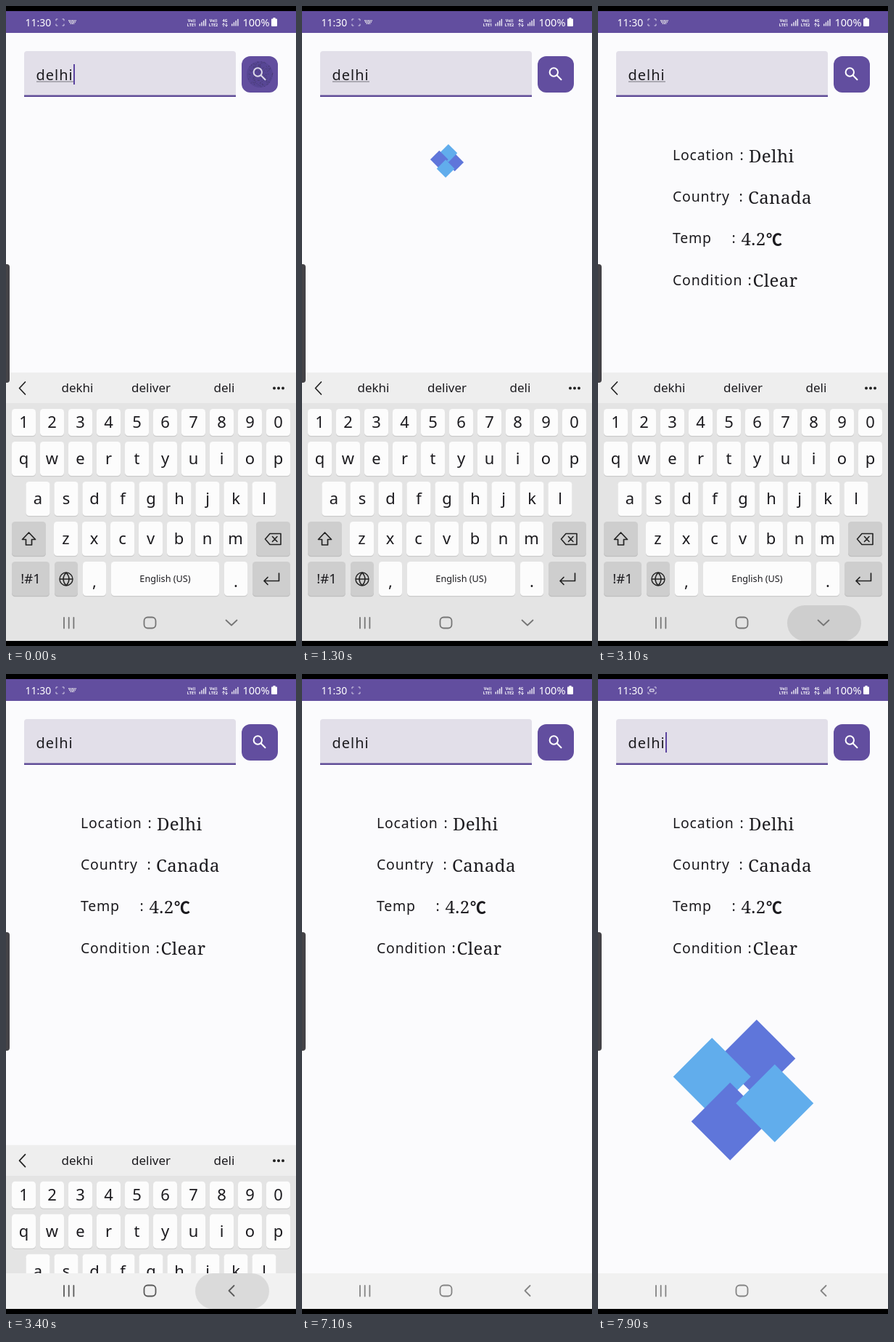
Animation of 400x880 px, one loop 8000 ms. Source, as an HTML page:

```html
<!DOCTYPE html>
<html lang="en">
<head>
<meta charset="utf-8">
<title>Weather search</title>
<style>
html, body { margin: 0; width: 100%; height: 100%; overflow: hidden; background: #fbfbfd; }
svg { display: block; width: 400px; height: 880px; }
text { font-family: "Noto Sans", "Open Sans", sans-serif; fill: #1c1b1f; white-space: pre; }
.mid { text-anchor: middle; }
.label { font-size: 19.5px; letter-spacing: .8px; }
.value { font-family: "Noto Serif", serif; font-size: 24px; letter-spacing: .4px; }
.unit { font: bold 22px "Noto Sans CJK JP", "Noto Sans CJK", sans-serif; }
.line { fill: none; stroke-linecap: round; stroke-linejoin: round; }
.bar text { fill: #fff; }
.tiny { font-size: 5.5px; font-weight: 700; text-anchor: middle; }
</style>
</head>
<body>
<svg id="stage" viewBox="0 0 400 880">
  <defs>
    <clipPath id="above"><rect width="400" height="824"/></clipPath>
    <clipPath id="btnClip"><rect x="325" y="69" width="50" height="50" rx="12"/></clipPath>
  </defs>
  <rect width="400" height="880" fill="#fbfbfd"/>

  <path d="M25 125V66q0-4 4-4H313q4 0 4 4V125z" fill="#e2dfe9"/>
  <rect x="25" y="122.5" width="292" height="2.5" fill="#604d98"/>
  <text x="41.5" y="102" font-size="20" letter-spacing="1">delhi</text>
  <rect id="spell" x="42" y="103.5" width="51" height="1" fill="#77747d"/>
  <rect id="caret" x="93" y="80" width="2" height="28" fill="#5d45a0"/>

  <rect x="325" y="69" width="50" height="50" rx="12" fill="#624e9f"/>
  <g id="ripple" clip-path="url(#btnClip)"></g>
  <g id="lens" class="line" stroke="#fff" stroke-width="2">
    <circle cx="347.3" cy="91" r="5.7"/><path d="M351.8 95.5L357.5 101.2"/>
  </g>

  <g id="results"></g>
  <g id="loader"></g>

  <rect id="nav" y="824" width="400" height="49" fill="#f1f1f1"/>
  <g clip-path="url(#above)"><g id="keys"></g></g>
  <rect id="press" x="261" y="824" width="102" height="49" rx="24.5" fill="#cecece"/>
  <g id="navIcons" class="line" stroke-width="1.8">
    <path d="M80 841V855.5M86.7 841V855.5M93.4 841V855.5"/>
    <rect x="190.5" y="840.5" width="16" height="15" rx="5"/>
    <path id="down" d="M303.5 844.5L311 851.5L318.5 844.5"/>
    <path id="back" d="M314.5 841L307.5 848L314.5 855"/>
  </g>

  <path d="M0 355H1q4 0 4 4V514q0 4-4 4H0z" fill="#444347"/>

  <rect width="400" height="7"/>
  <rect y="7" width="400" height="30" fill="#624e9f"/>
  <g class="bar" id="status">
    <text x="26.5" y="28" font-size="14">11:30</text>
    <path d="M69 20V18H71M78 18H80V20M80 25V27H78M71 27H69V25" class="line" stroke="#d5cfe6" stroke-width="1"/>
    <path id="cast" d="M72 21H77V24H72z" class="line" stroke="#fff"/>
    <path id="kbIcon" d="M86 20.2H97M87 22.2H96M88.5 24.2H94.5" stroke="#eee" stroke-width="1.3" stroke-dasharray="2 .5"/>
    <text class="tiny" x="256" y="21.5">Vo))</text><text class="tiny" x="256" y="28">LTE1</text>
    <text class="tiny" x="286" y="21.5">Vo))</text><text class="tiny" x="286" y="28">LTE2</text>
    <text class="tiny" x="302" y="21.5">4G</text>
    <path d="M300 28V24M298.6 25.4L300 23.8L301.4 25.4M304 23.8V28M302.6 26.4L304 28L305.4 26.4" class="line" stroke="#fff" stroke-width=".9"/>
    <text x="326.5" y="28" font-size="14.5">100%</text>
    <path d="M368.5 16H371.5V17.5H373q1 0 1 1V27q0 1-1 1H367q-1 0-1-1V18.5q0-1 1-1H368.5z" fill="#fff"/>
  </g>
  <rect y="873" width="400" height="7"/>
</svg>
<script>
const LOOP = 8000;
const $ = id => document.getElementById(id);

function add(parent, tag, attrs, content) {
  const el = document.createElementNS("http://www.w3.org/2000/svg", tag);
  for (const k in attrs) el.setAttribute(k, attrs[k]);
  if (content) el.textContent = content;
  parent.appendChild(el);
  return el;
}
const show = (el, on) => el.setAttribute("visibility", on ? "visible" : "hidden");
const ramp = (t, a, b) => Math.min(1, Math.max(0, (t - a) / (b - a)));

// Signal bars
for (const x of [266.5, 292, 311]) {
  if (x === 292) continue;
  for (let i = 0; i < 4; i++) {
    const h = 3 + i * 2.2;
    add($("status"), "rect", { x: x + i * 2.7, y: 27.5 - h, width: 1.5, height: h, fill: "#fff", opacity: .85 });
  }
}

// Weather rows: label, colon x, value x, value
[["Location", 195.5, 208, "Delhi"], ["Country", 194.5, 207, "Canada"],
 ["Temp", 184.5, 197.5, "4.2"], ["Condition", 206.5, 213.5, "Clear"]
].forEach(([label, cx, vx, value], i) => {
  const y = 212 + i * 57.2;
  add($("results"), "text", { x: 103, y, class: "label" }, label);
  add($("results"), "text", { x: cx, y, class: "label" }, ":");
  add($("results"), "text", { x: vx, y: y + 2.7, class: "value" }, value);
});
add($("results"), "text", { x: 232, y: 328.5, class: "unit" }, "℃");

// Keyboard
const kb = $("keys");
function key(x, y, w, h, label, size = 22, dark = false) {
  add(kb, "rect", { x, y: y + 1.2, width: w, height: h, rx: 4.5, fill: dark ? "#bebebe" : "#cbcbcb" });
  add(kb, "rect", { x, y, width: w, height: h, rx: 4.5, fill: dark ? "#cecece" : "#fcfcfc" });
  if (label) add(kb, "text", { x: x + w / 2, y: y + h / 2 + size * .36, class: "mid", "font-size": size }, label);
}
function row(chars, x, y, h) {
  [...chars].forEach((c, i) => key(x + i * 39, y, 33, h, c));
}
const stroke = (d, w = 1.7) => add(kb, "path", { d, class: "line", stroke: "#222", "stroke-width": w });

add(kb, "rect", { y: 504, width: 400, height: 42, fill: "#eeeeee" });
add(kb, "rect", { y: 546, width: 400, height: 327, fill: "#e4e4e4" });
stroke("M26.5 517L18.5 525.5L26.5 534");
[["dekhi", 98.5], ["deliver", 200], ["deli", 301]].forEach(([s, x]) =>
  add(kb, "text", { x, y: 531, class: "mid", "font-size": 17 }, s));
for (const x of [370, 376, 382]) add(kb, "circle", { cx: x, cy: 525.5, r: 2, fill: "#222" });
row("1234567890", 8, 554, 37);
row("qwertyuiop", 8, 599, 47);
row("asdfghjkl", 27.5, 654, 47);
row("zxcvbnm", 66, 709, 47);
key(8, 709, 47, 47, "", 0, true);
stroke("M31.5 724L22.5 733.5H27.5V741H35.5V733.5H40.5z");
key(345, 709, 47, 47, "", 0, true);
stroke("M364 725.5H379V740.5H364L357.5 733zM367.5 729.5L374 736.5M374 729.5L367.5 736.5", 1.6);
key(8, 764, 52, 47, "!#1", 18.5, true);
key(67, 764, 32, 47, "", 0, true);
stroke("M74 788a9 9 0 1 0 18 0a9 9 0 1 0-18 0M74 788H92M83 779q-8 9 0 18q8-9 0-18", 1.4);
key(106, 764, 32, 47);
add(kb, "text", { x: 122, y: 799, class: "mid", "font-size": 22 }, ",");
key(145, 764, 149, 47, "English (US)", 12.7);
key(301, 764, 32, 47);
add(kb, "text", { x: 317, y: 799, class: "mid", "font-size": 22 }, ".");
key(340, 764, 52, 47, "", 0, true);
stroke("M376.5 780V790.5H356M361 785.5L356 790.5L361 795.5");

// Button press sparkle
add($("ripple"), "circle", { cx: 350, cy: 94, r: 18, fill: "#574694" });
let seed = 7;
const rnd = () => (seed = seed * 16807 % 2147483647) / 2147483647;
for (let i = 0; i < 130; i++) {
  const a = rnd() * 2 * Math.PI, r = 18 * Math.sqrt(rnd());
  add($("ripple"), "circle", { cx: 350 + r * Math.cos(a), cy: 94 + r * Math.sin(a), r: .6, fill: "#463a70" });
}

// Four diamonds circling a centre, listed from back to front
const DARK = "#5f76da", LIGHT = "#61adec";
const diamonds = [270, 180, 90, 0].map((turn, i) => ({
  turn, el: add($("loader"), "path", { d: "M0-53.5L53.5 0L0 53.5L-53.5 0z", fill: i % 2 ? LIGHT : DARK })
}));
const SPEED = 0.1746;
const loaders = [
  { from: 200, to: 1500, begin: 212, x: 200, y: 213, scale: .231 },
  { from: 7200, to: LOOP, begin: 7254, x: 200.5, y: 572, scale: 1 }
];
function drawLoader(t) {
  const l = loaders.find(o => t >= o.from && t < o.to);
  show($("loader"), l);
  if (!l) return;
  $("loader").setAttribute("transform", `translate(${l.x} ${l.y}) scale(${l.scale})`);
  for (const { turn, el } of diamonds) {
    const a = ((t - l.begin) * SPEED + turn) * Math.PI / 180;
    el.setAttribute("transform", `translate(${47 * Math.sin(a)} ${-47 * Math.cos(a)})`);
  }
}

function draw(t) {
  const caretOn = t < 100 || (t >= 600 && (t - 600) % 1000 < 500);
  show($("caret"), caretOn);
  show($("spell"), t < 3400);
  show($("results"), t >= 1500);
  show($("cast"), t >= 7700 || (t >= 5700 && t < 6200));
  show($("kbIcon"), t < 3600);

  const glow = 1 - ramp(t, 100, 600);
  $("ripple").setAttribute("opacity", glow);
  $("lens").setAttribute("opacity", 1 - .2 * glow);
  drawLoader(t);

  const slide = ramp(t, 3200, 3500);
  kb.setAttribute("transform", `translate(0 ${320 * slide * slide})`);
  show(kb, slide < 1);
  const open = t < 3300;
  $("nav").setAttribute("fill", open ? "#e4e4e4" : "#f1f1f1");
  show($("down"), open);
  show($("back"), !open);

  const grow = ramp(t, 2980, 3080);
  $("press").setAttribute("opacity", grow * (1 - ramp(t, 3250, 3650)));
  const grey = open ? 118 : 90 + 42 * ramp(t, 5100, 5400);
  $("navIcons").setAttribute("stroke", `rgb(${grey},${grey},${grey})`);
}

const start = performance.now();
function tick() {
  draw((performance.now() - start) % LOOP);
  requestAnimationFrame(tick);
}
tick();
</script>
</body>
</html>
```
